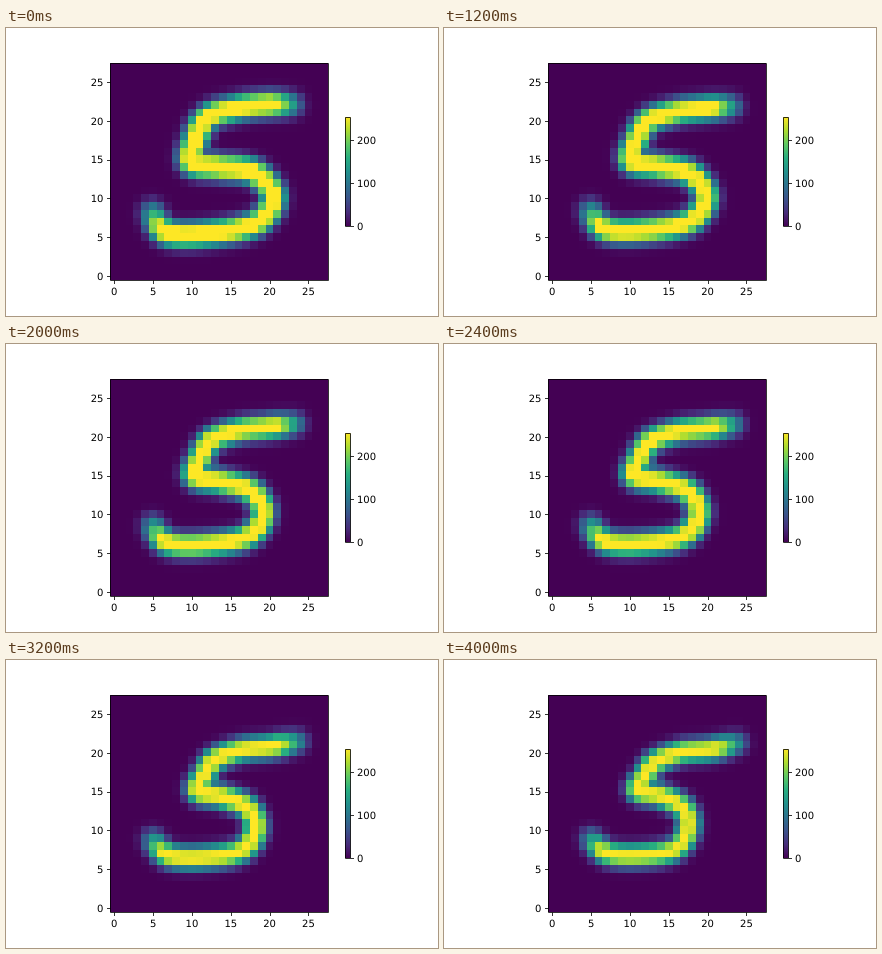
Recreate the animation shown at these times as an HTML page. Size 432 by 288 pixels, loop 4200 ms.

```html
<!DOCTYPE html>
<html lang="en">
<head>
<meta charset="utf-8">
<title>Heatmap of a handwritten five</title>
<style>
  html, body { margin: 0; width: 100%; height: 100%; overflow: hidden; background: #fff; }
  svg { display: block; font: 10px "DejaVu Sans", sans-serif; text-rendering: geometricPrecision; }
  .line { fill: none; stroke: #000; stroke-width: .8; }
  .end { text-anchor: end; }
  .mid { text-anchor: middle; }
</style>
</head>
<body>
<svg width="432" height="288" viewBox="0 0 432 288">
  <defs><linearGradient id="scale" x1="0" y1="1" x2="0" y2="0"></linearGradient></defs>
  <g id="cells" shape-rendering="crispEdges"></g>
  <rect x="339" y="89" width="5.5" height="109" fill="url(#scale)"/>
  <g id="axes"></g>
</svg>
<script>
const N = 28, STEP = 200, STEPS = 21;

const viridis = ['440154', '472d7b', '3b528b', '2c728e', '21918c',
                 '28ae80', '5ec962', 'addc30', 'fde725']
  .map(h => [0, 2, 4].map(i => parseInt(h.slice(i, i + 2), 16)));

// Key points of the stroke in data units: x, y at the start, x, y at the end
const keys = [
  [22.8, 22, 23.8, 21.2], [19.5, 22, 20.5, 20.4], [15.5, 21.5, 16.5, 20],
  [12, 20.3, 13.3, 18.7], [10.4, 17.3, 11.8, 16.8], [10, 14.6, 11, 15.1],
  [13.5, 14, 14, 14.4], [18, 13.3, 16.9, 12.8], [20.5, 10.2, 17.5, 10.2],
  [18.3, 6.8, 15.7, 7.5], [12, 5.45, 11, 6.75], [6.8, 5.6, 7, 7.1], [4.9, 8.2, 5, 8.9]
];

const mix = (a, b, t) => a + (b - a) * t;

function add(parent, tag, attrs, text = '') {
  const el = document.createElementNS('http://www.w3.org/2000/svg', tag);
  for (const k in attrs) el.setAttribute(k, attrs[k]);
  el.textContent = text;
  return parent.appendChild(el);
}

function color(v) {
  const top = viridis.length - 1, p = Math.min(v / 255, 1) * top;
  const i = Math.min(Math.floor(p), top - 1);
  return `rgb(${viridis[i].map((c, k) => Math.round(mix(c, viridis[i + 1][k], p - i)))})`;
}

// Catmull-Rom from b to c
function spline(a, b, c, d, t) {
  return b + t / 2 * (c - a + t * (2 * a - 5 * b + 4 * c - d + t * (3 * (b - c) + d - a)));
}

// Samples along the stroke: x, y, strength (fading at both tips)
function stroke(t) {
  const pts = keys.map(([x0, y0, x1, y1]) => [mix(x0, x1, t ** 1.25), mix(y0, y1, t)]);
  const end = pts.length - 1;
  const at = i => pts[Math.min(Math.max(i, 0), end)];
  const out = [];
  for (let u = 0; u <= end; u += 1 / 16) {
    const i = Math.floor(u);
    const [x, y] = [0, 1].map(k => spline(at(i - 1)[k], at(i)[k], at(i + 1)[k], at(i + 2)[k], u - i));
    out.push([x, y, Math.min(1, .38 + .8 * Math.min(u, end - u))]);
  }
  return out;
}

function heatmap(t) {
  const path = stroke(t), peak = mix(285, 255, t), radius = mix(1.62, 1.5, t);
  return cells.map((_, n) => {
    const x = n % N, y = Math.floor(n / N);
    return color(Math.max(...path.map(([sx, sy, w]) =>
      w * peak * Math.exp(-((Math.hypot(x - sx, y - sy) / radius) ** 2.5)))));
  });
}

// The image fills 218 whole pixels, with cell edges on pixel borders
const edge = i => Math.ceil(i * 218 / N - .5);
const grid = document.getElementById('cells'), axes = document.getElementById('axes');
const cells = Array.from({ length: N * N }, (_, n) => {
  const c = n % N, r = Math.floor(n / N);
  const x = 104 + edge(c), y = 34 + edge(N - 1 - r);
  return add(grid, 'rect', {
    x, y, width: 104 + edge(c + 1) - x, height: 34 + edge(N - r) - y
  });
});
add(grid, 'rect', { x: 104, y: 34, width: 218, height: 1, fill: '#fff' });

const scale = document.getElementById('scale');
viridis.forEach((c, i) => add(scale, 'stop', {
  offset: i / (viridis.length - 1), 'stop-color': `rgb(${c})`
}));

const snap = v => Math.floor(v + .5) + .5;
const px = v => 104.4 + (v + .5) * 217.44 / N;
const py = v => 252 - (v + .5) * 217.44 / N;
const line = d => add(axes, 'path', { class: 'line', d });

line('M104.5 35.5H322.5V252.5H104.5Z');
line('M339.5 89.5H344.5V198.5H339.5Z');
for (let v = 0; v <= 25; v += 5) {
  line(`M${snap(px(v))} 252.5v3.5`);
  line(`M104.5 ${snap(py(v))}h-3.5`);
  add(axes, 'text', { x: px(v), y: 267, class: 'mid' }, v);
  add(axes, 'text', { x: 97.4, y: Math.round(py(v) + 3.8), class: 'end' }, v);
}
for (let v = 0; v <= 200; v += 100) {
  const y = 197.64 - v / 255 * 108.72;
  line(`M344.5 ${snap(y)}h3.5`);
  add(axes, 'text', { x: 351, y: Math.round(y + 4) }, v);
}

const frames = Array.from({ length: STEPS }, (_, i) => heatmap(i / (STEPS - 1)));
const start = performance.now();
let shown = -1;

function tick() {
  const i = Math.floor((performance.now() - start) / STEP) % STEPS;
  if (i !== shown) {
    shown = i;
    cells.forEach((cell, n) => cell.setAttribute('fill', frames[i][n]));
  }
  requestAnimationFrame(tick);
}
tick();
</script>
</body>
</html>
```
